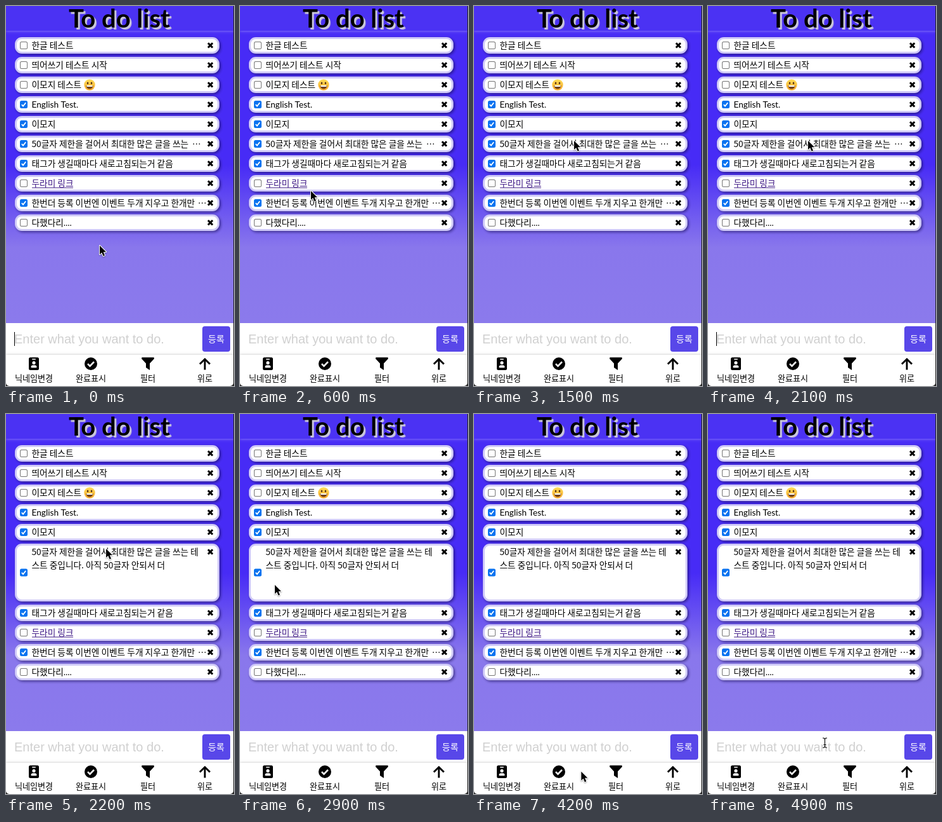
Animation, 360 px wide and 598 px high, one loop 5000 ms. Source, as an HTML page with a canvas:

```html
<!DOCTYPE html>
<html lang="ko">
<head>
<meta charset="utf-8">
<title>To do list</title>
<style>
html, body { margin: 0; width: 100%; height: 100%; overflow: hidden; background: #fff; }
canvas { display: block; width: 360px; height: 598px; }
</style>
</head>
<body>
<canvas id="stage"></canvas>
<script>
const W = 360, H = 598, LOOP = 5000, OPEN_AT = 2200, GROW = 65;
const HANGUL = '"Noto Sans CJK KR", "Noto Sans CJK JP", "Noto Sans CJK", sans-serif';
const MIXED = 'Lato, ' + HANGUL;
const canvas = document.getElementById('stage');
const c = canvas.getContext('2d');
const dpr = window.devicePixelRatio || 1;
canvas.width = W * dpr;
canvas.height = H * dpr;
c.scale(dpr, dpr);

const items = [
  { text: '한글 테스트' },
  { text: '띄어쓰기 테스트 시작' },
  { text: '이모지 테스트', emoji: true },
  { text: 'English Test.', done: true, font: MIXED },
  { text: '이모지', done: true },
  { text: '50글자 제한을 걸어서 최대한 많은 글을 쓰는', done: true, dots: 294,
    lines: ['50글자 제한을 걸어서 최대한 많은 글을 쓰는 테', '스트 중입니다. 아직 50글자 안되서 더'] },
  { text: '태그가 생길때마다 새로고침되는거 같음', done: true },
  { text: '두라미 링크', link: true },
  { text: '한번더 등록 이번엔 이벤트 두개 지우고 한개만', done: true, dots: 303 },
  { text: '다했다리....', font: MIXED }
];

// Pointer keys: time, x, y
const path = [
  [0, 148, 377], [200, 145, 370], [600, 112, 291], [1000, 79, 210],
  [1300, 158, 212], [2300, 158, 212], [2600, 110, 238], [2900, 55, 269],
  [3100, 100, 503], [3600, 121, 510], [3800, 121, 522], [4000, 128, 560],
  [4300, 190, 564], [4500, 200, 556], [4700, 190, 528], [4900, 184, 517]
];

function box(x, y, w, h, r, fill) {
  c.beginPath();
  c.roundRect(x, y, w, h, r);
  c.fillStyle = fill;
  c.fill();
}

function disc(x, y, r, fill) {
  c.beginPath();
  c.arc(x, y, r, 0, Math.PI * 2);
  c.fillStyle = fill;
  c.fill();
}

function trace(pts, close) {
  c.beginPath();
  pts.forEach(([x, y], i) => i ? c.lineTo(x, y) : c.moveTo(x, y));
  if (close) c.closePath();
}

function line(pts, color, width) {
  trace(pts);
  c.strokeStyle = color;
  c.lineWidth = width;
  c.stroke();
}

function label(text, x, y, font, color = '#000', align = 'left') {
  c.font = font;
  c.fillStyle = color;
  c.textAlign = align;
  c.fillText(text, x, y);
}

function shadow(color, blur, x, y) {
  c.shadowColor = color;
  c.shadowBlur = blur * dpr;
  c.shadowOffsetX = x * dpr;
  c.shadowOffsetY = y * dpr;
}

function backdrop() {
  const g = c.createLinearGradient(0, 0, 0, 500);
  g.addColorStop(0, '#472bf6');
  g.addColorStop(0.5, '#472bf6');
  g.addColorStop(0.76, '#8977ec');
  g.addColorStop(1, '#8b7aec');
  c.fillStyle = g;
  c.fillRect(0, 0, W, 500);
}

function header() {
  c.save();
  shadow('rgba(170,160,250,.6)', 4, 0, 1);
  box(0, 0, W, 39, 0, '#4b32f3');
  c.restore();
  c.save();
  shadow('#cbc8dc', 1, 3, 3);
  label('To do list', 179, 34, 'bold 40px ' + MIXED, '#000', 'center');
  c.restore();
}

function checkbox(x, y, done) {
  if (done) {
    box(x - 6, y - 6, 12, 12, 2.5, '#0a73f0');
    line([[x - 3.2, y + .2], [x - 1, y + 2.6], [x + 3.2, y - 2.8]], '#fff', 1.8);
  } else {
    box(x - 6, y - 6, 12, 12, 2.5, '#767676');
    box(x - 5, y - 5, 10, 10, 1.5, '#fff');
  }
}

function grin(x, y) {
  const g = c.createLinearGradient(0, y - 9, 0, y + 9);
  g.addColorStop(0, '#ffe05a');
  g.addColorStop(1, '#f5a52a');
  disc(x, y, 8.7, g);
  for (const side of [-3, 3]) {
    c.beginPath();
    c.ellipse(x + side, y - 2.7, 1.2, 1.9, 0, 0, Math.PI * 2);
    c.fillStyle = '#5b3413';
    c.fill();
  }
  c.beginPath();
  c.arc(x, y + 1, 5.6, 0, Math.PI);
  c.closePath();
  c.fillStyle = '#70401b';
  c.fill();
  box(x - 4.8, y + 1, 9.6, 2, .8, '#fff');
}

function card(item, top, open) {
  const h = open ? 26 + GROW : 26;
  const cy = top + 13;
  c.save();
  shadow('rgba(20,10,80,.6)', 4, 2, 2);
  box(14, top, 323, h, 11, '#cfc9f8');
  c.restore();
  box(17, top + 3, 317, h - 6, 8, '#fff');
  checkbox(28, top + h / 2, item.done);

  const font = '13.7px ' + (item.font || HANGUL);
  const color = item.link ? '#3d1785' : '#000';
  const lines = open ? item.lines : [item.text];
  lines.forEach((s, i) => label(s, 40.5, cy + 4.8 + i * 21, font, color));
  if (item.link) {
    c.fillRect(41, cy + 6.5, c.measureText(item.text).width - 1, 1);
  }
  if (item.emoji) grin(132, cy);
  if (item.dots && !open) label('⋯', item.dots, cy + 4.8, font);
  label('✖', 322.5, cy + 5, '14px "DejaVu Sans", sans-serif', '#000', 'center');
}

function list(open) {
  let top = 49;
  for (const item of items) {
    const grown = open && !!item.lines;
    card(item, top, grown);
    top += 31 + (grown ? GROW : 0);
  }
}

function badge(x, y) {
  box(x - 8, y - 10, 16, 20, 2.5, '#000');
  box(x - 3, y - 8, 6, 1.5, .7, '#fff');
  disc(x, y - 1.5, 2.6, '#fff');
  box(x - 4.5, y + 2.2, 9, 4, [3, 3, 1, 1], '#fff');
}

function tick(x, y) {
  disc(x, y, 10, '#000');
  line([[x - 5, y + .2], [x - 1.5, y + 3.7], [x + 5, y - 3]], '#fff', 2.6);
}

function funnel(x, y) {
  trace([[x - 9.5, y - 10], [x + 9.5, y - 10], [x + 10, y - 8], [x + 3, y - .5],
    [x + 3, y + 10], [x - 3, y + 6], [x - 3, y - .5], [x - 10, y - 8]], true);
  c.fillStyle = '#000';
  c.fill();
}

function upArrow(x, y) {
  line([[x - 8, y + .5], [x, y - 7.3], [x + 8, y + .5]], '#000', 2.9);
  line([[x, y - 6], [x, y + 9.5]], '#000', 2.9);
}

function footer(caret) {
  box(0, 499, W, 99, 0, '#fff');
  label('Enter what you want to do.', 13, 531,
    '20px "Liberation Sans", Arial, sans-serif', '#d0d0d0');
  if (caret) box(13, 513, 1, 22, 0, '#000');
  box(310, 504, 44, 40, 4, '#5847e9');
  label('등록', 332, 529, '14px ' + HANGUL, '#fff', 'center');

  c.save();
  shadow('rgba(0,0,0,.25)', 4, 0, 0);
  box(0, 549, W, 60, 0, '#fff');
  c.restore();
  const tabs = [['닉네임변경', badge], ['완료표시', tick], ['필터', funnel], ['위로', upArrow]];
  tabs.forEach(([name, icon], i) => {
    const x = 44 + i * 90;
    icon(x, 563);
    label(name, x, 590.5, '13.1px ' + HANGUL, '#000', 'center');
  });
}

function windowEdge() {
  c.fillStyle = '#222';
  c.fillRect(359, 0, 1, H);
  c.beginPath();
  c.rect(0, H - 6, W, 6);
  c.roundRect(0, H - 20, 359, 20, [0, 0, 5, 5]);
  c.save();
  c.clip('evenodd');
  c.fillRect(0, H - 6, W, 6);
  c.restore();
}

function pointerAt(t) {
  let i = 1;
  while (i < path.length - 1 && path[i][0] < t) i++;
  const [t0, x0, y0] = path[i - 1], [t1, x1, y1] = path[i];
  const k = Math.min(1, (t - t0) / (t1 - t0));
  return [x0 + (x1 - x0) * k, y0 + (y1 - y0) * k];
}

function pointer(x, y) {
  c.save();
  c.translate(x, y);
  if (y > 499 && y < 547) {
    const beam = (color, width) => {
      line([[-3, -7], [-1, -7], [.5, -5.5], [2, -7], [4, -7]], color, width);
      line([[-3, 8], [-1, 8], [.5, 6.5], [2, 8], [4, 8]], color, width);
      line([[.5, -6], [.5, 7]], color, width);
      line([[-1.5, 3.5], [2.5, 3.5]], color, width);
    };
    beam('#fff', 2.6);
    beam('#000', 1.1);
  } else {
    trace([[0, 0], [0, 14], [3.2, 11], [5.6, 16.5], [8, 15.4], [5.7, 10.2], [10, 10]], true);
    shadow('rgba(0,0,0,.35)', 2, 0, 1);
    c.lineJoin = 'round';
    c.lineWidth = 2;
    c.strokeStyle = '#fff';
    c.stroke();
    shadow('transparent', 0, 0, 0);
    c.fillStyle = '#000';
    c.fill();
  }
  c.restore();
}

function draw(t) {
  c.clearRect(0, 0, W, H);
  const open = t >= OPEN_AT;
  backdrop();
  header();
  list(open);
  footer(!open && t % 1000 < 500);
  windowEdge();
  pointer(...pointerAt(t));
}

const start = performance.now();
function tickFrame() {
  const t = Math.floor((performance.now() - start) % LOOP / 100) * 100;
  draw(t < 200 ? 0 : t);
  requestAnimationFrame(tickFrame);
}
tickFrame();
</script>
</body>
</html>
```
